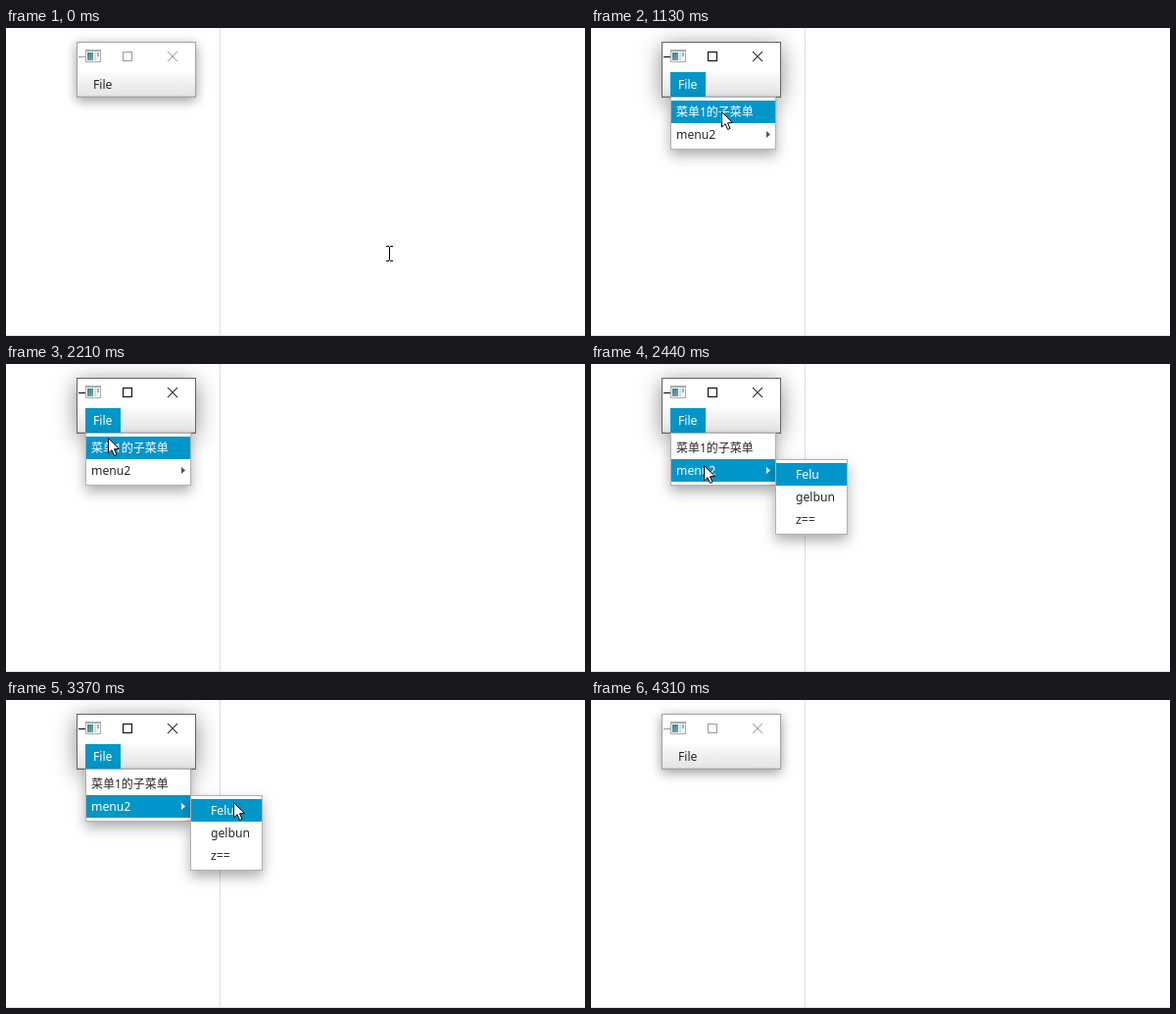
An HTML page with a canvas for the animation above (4.46 s loop, 591 px wide and 314 px high).

```html
<!DOCTYPE html>
<html lang="en">
<head>
<meta charset="utf-8">
<title>Menu demo</title>
<style>
  html, body { margin: 0; width: 100%; height: 100%; overflow: hidden; background: #fff; }
  canvas { display: block; }
</style>
</head>
<body>
<canvas id="stage" width="591" height="314"></canvas>
<script>
const ctx = document.getElementById('stage').getContext('2d');
const LOOP = 4460;
const BLUE = '#0096c9';
const INK = '#262626';
const CLOSED = -1;

// The screen refreshes only in bursts: [first refresh, last refresh, count]
const bursts = [
  [70, 590, 8], [670, 1130, 7], [1590, 1980, 6], [2130, 2590, 7],
  [2670, 2820, 3], [2990, 3450, 7], [3530, 3760, 4], [4310, 4310, 1]
];

// [time, window active, highlighted menu row (0 = none), highlighted submenu row (0 = hidden)]
const states = [
  [0, false, CLOSED, 0], [510, true, 0, 0], [740, true, 1, 0], [820, true, 2, 1],
  [1050, true, 1, 0], [1585, true, CLOSED, 0], [1975, true, 0, 0], [2200, true, 1, 0],
  [2355, true, 2, 1], [2985, true, 2, 2], [3060, true, 2, 3], [3215, true, 2, 2],
  [3290, true, 2, 1], [3445, true, 2, 2], [3525, true, 2, 3], [4305, false, CLOSED, 0]
];

// Pointer waypoints: [time, shape, x, y]
const pointerPath = [
  [0, 'beam', 391, 230], [70, 'beam', 378, 222], [292, 'beam', 225, 120],
  [366, 'arrow', 150, 66], [515, 'arrow', 102, 56], [590, 'arrow', 102, 54],
  [670, 'arrow', 102, 71], [746, 'arrow', 103, 84], [823, 'arrow', 108, 104],
  [977, 'arrow', 135, 108], [1130, 'arrow', 133, 85], [1590, 'arrow', 133, 85],
  [1668, 'beam', 128, 84], [1746, 'beam', 114, 81], [1824, 'resize', 107, 73],
  [1902, 'arrow', 103, 62], [1980, 'arrow', 99, 50], [2130, 'arrow', 100, 58],
  [2283, 'arrow', 108, 92], [2436, 'arrow', 115, 103], [2590, 'arrow', 131, 111],
  [2820, 'arrow', 245, 117], [2990, 'arrow', 243, 128], [3143, 'arrow', 238, 166],
  [3296, 'arrow', 233, 124], [3373, 'arrow', 232, 104], [3450, 'arrow', 234, 128],
  [3530, 'arrow', 258, 160], [3606, 'beam', 370, 230], [3683, 'beam', 488, 302],
  [3759, 'none', 488, 302]
];

const latest = (list, t) => list.findLast(item => item[0] <= t);

function refreshTime(t) {
  const burst = latest(bursts, t);
  if (!burst) return 0;
  const [start, end, count] = burst;
  const interval = (end - start) / Math.max(1, count - 1);
  const step = Math.min(count - 1, Math.floor((t + 5 - start) / interval));
  return start + step * interval;
}

function pointerAt(t) {
  const from = latest(pointerPath, t);
  const to = pointerPath[pointerPath.indexOf(from) + 1] || from;
  const k = to === from ? 0 : (t - from[0]) / (to[0] - from[0]);
  const mix = i => Math.round(from[i] + (to[i] - from[i]) * k);
  return { shape: from[1], x: mix(2), y: mix(3) };
}

function rect(x, y, w, h, color) {
  ctx.fillStyle = color;
  ctx.fillRect(x, y, w, h);
}

function text(str, x, y, color = INK, size = 12.2) {
  ctx.font = `${size}px "Noto Sans", "Noto Sans CJK SC", "Noto Sans CJK", sans-serif`;
  ctx.fillStyle = color;
  ctx.fillText(str, x, y);
}

function shape(points, fill, stroke) {
  ctx.beginPath();
  points.forEach(([x, y]) => ctx.lineTo(x, y));
  ctx.closePath();
  ctx.fillStyle = fill;
  ctx.fill();
  if (!stroke) return;
  ctx.strokeStyle = stroke;
  ctx.lineWidth = 1;
  ctx.stroke();
}

function panel(x, y, w, h, border, blur, drop, alpha) {
  ctx.save();
  ctx.shadowColor = `rgba(0,0,0,${alpha})`;
  ctx.shadowBlur = blur;
  ctx.shadowOffsetY = drop;
  rect(x, y, w, h, border);
  ctx.restore();
  rect(x + 1, y + 1, w - 2, h - 2, '#fff');
}

function drawAppIcon() {
  rect(81, 22, 16, 13, '#a9adad');
  rect(82, 24, 14, 10, '#f3f4f4');
  const teal = ctx.createLinearGradient(83, 25, 89, 33);
  teal.addColorStop(0, '#3f7f91');
  teal.addColorStop(1, '#74ae9c');
  rect(83, 25, 6, 8, teal);
  rect(90, 25, 2, 8, '#d5d9d9');
  rect(93, 25, 2, 4, '#9fb3b3');
}

function drawWindow(active, hot) {
  const ink = active ? '#000' : '#999';
  if (active) panel(72, 14, 122, 57, '#646464', 22, 4, 0.45);
  else panel(72, 14, 122, 57, '#a2a2a2', 11, 3, 0.4);

  const bar = ctx.createLinearGradient(0, 44, 0, 70);
  bar.addColorStop(0, '#fcfcfc');
  bar.addColorStop(1, '#e3e3e3');
  rect(73, 45, 120, 24, bar);
  rect(73, 69, 120, 1, '#c8c8c8');

  rect(74, 29, 7, 1, ink);
  drawAppIcon();
  ctx.strokeStyle = ink;
  ctx.lineWidth = 1;
  ctx.strokeRect(119.5, 24.5, 9, 9);
  ctx.beginPath();
  ctx.moveTo(165, 24);
  ctx.lineTo(175, 34);
  ctx.moveTo(175, 24);
  ctx.lineTo(165, 34);
  ctx.stroke();

  if (hot) rect(81, 45, 36, 25, BLUE);
  text('File', 89, 62, hot ? '#fff' : INK);
}

function drawMenu(row) {
  panel(81, 70, 108, 54, '#b0b0b0', 12, 6, 0.32);
  if (row > 0) rect(82, 51 + row * 23, 106, 23, BLUE);
  const color = n => row === n ? '#fff' : INK;
  text('菜单1的子菜单', 87, 90, color(1), 12);
  text('menu2', 87, 113, color(2));
  shape([[179, 105], [183, 108.5], [179, 112]], row === 2 ? '#fff' : '#555');
}

function drawSubmenu(row) {
  panel(188, 97, 74, 77, '#b0b0b0', 12, 6, 0.32);
  rect(189, 78 + row * 23, 72, 23, BLUE);
  ['Felu', 'gelbun', 'z=='].forEach((label, i) =>
    text(label, 209, 117 + i * 23, row === i + 1 ? '#fff' : INK));
}

const pointers = {
  none() {},
  arrow() {
    shape([[.5, .5], [.5, 16], [4, 12.7], [6.6, 18.5], [9, 17.4], [6.5, 11.8], [11.3, 11.5]],
      '#fff', '#000');
  },
  beam() {
    rect(0, -7, 1, 14, '#000');
    for (const y of [-8, 7]) {
      rect(-3, y, 3, 1, '#000');
      rect(1, y, 3, 1, '#000');
    }
  },
  resize() {
    const half = [[0, -11], [4.5, -6.5], [4.5, -5.5], [1.5, -5.5], [1.5, 5.5], [4.5, 5.5], [4.5, 6.5], [0, 11]];
    const mirrored = half.slice(1, -1).reverse().map(([x, y]) => [-x, y]);
    ctx.translate(.5, .5);
    shape([...half, ...mirrored], '#fff', '#000');
  }
};

function draw(time) {
  const t = refreshTime(time);
  const [, active, row, subRow] = latest(states, t);
  const pointer = pointerAt(t);
  const open = row !== CLOSED;
  const overFile = pointer.shape === 'arrow' &&
    pointer.x >= 81 && pointer.x < 117 && pointer.y >= 45 && pointer.y < 70;

  rect(0, 0, 591, 314, '#fff');
  rect(218, 0, 1, 313, '#dedede');
  rect(0, 313, 591, 1, '#e2e2e2');
  drawWindow(active, open || overFile);
  if (open) drawMenu(row);
  if (subRow) drawSubmenu(subRow);

  ctx.save();
  ctx.translate(pointer.x, pointer.y);
  pointers[pointer.shape]();
  ctx.restore();
}

const began = performance.now();
function tick() {
  draw((performance.now() - began) % LOOP);
  requestAnimationFrame(tick);
}
tick();
</script>
</body>
</html>
```
